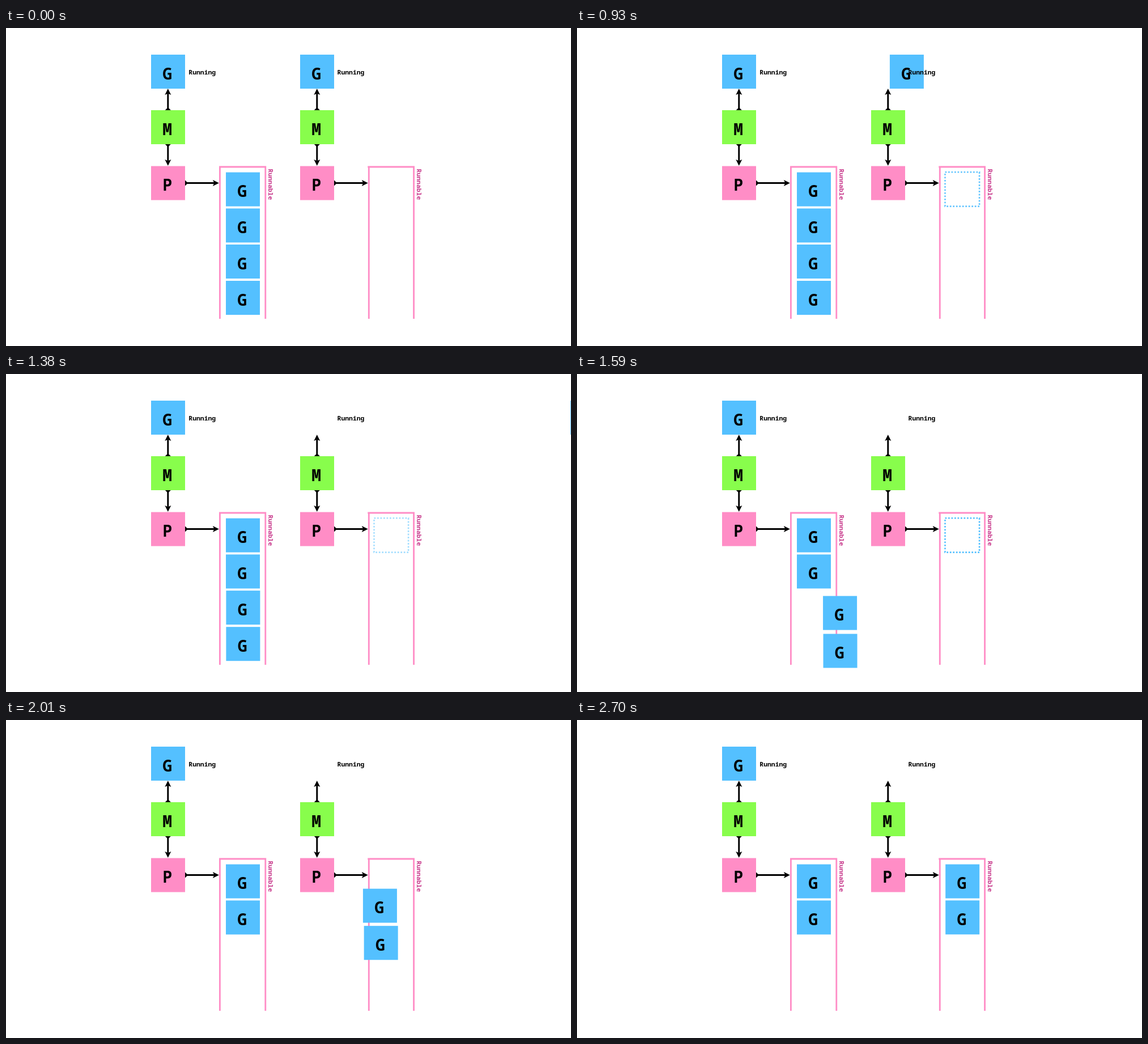
Animation, 997 px wide and 561 px high, one loop 2.73 s. Source, as an HTML page:

```html
<!DOCTYPE html>
<html lang="en">
<head>
<meta charset="utf-8">
<title>Work stealing</title>
<style>
  html, body { margin: 0; width: 100%; height: 100%; overflow: hidden; background: #fff; }
  svg { display: block; width: 100%; height: 100%; }
  text { font-family: "Noto Sans Mono", "DejaVu Sans Mono", monospace; font-weight: 600; }
  .letter { font-size: 28px; text-anchor: middle; }
  .label { font-size: 11.4px; }
</style>
</head>
<body>
<svg id="stage" viewBox="0 0 997 561"></svg>
<script>
const BLUE = '#54c0ff', GREEN = '#88fd4c', PINK = '#ff8dc6', MAGENTA = '#c83a8c';
const LOOP = 2730, STEP = 30, SIZE = 60;
const stage = document.getElementById('stage');

function add(tag, attrs, text) {
  const el = document.createElementNS('http://www.w3.org/2000/svg', tag);
  for (const key in attrs) el.setAttribute(key, attrs[key]);
  if (text) el.textContent = text;
  return el;
}

function draw(tag, attrs, text) {
  return stage.appendChild(add(tag, attrs, text));
}

function place(el, x, y) {
  el.setAttribute('transform', `translate(${x.toFixed(2)} ${y.toFixed(2)})`);
}

function box(x, y, letter, fill) {
  const g = draw('g', {});
  g.append(
    add('rect', { width: SIZE, height: SIZE, fill }),
    add('text', { x: 28.7, y: 43.7, class: 'letter' }, letter)
  );
  place(g, x, y);
  return g;
}

// Arrow of the given length, pointing along the angle, with a small wedge at its tail
function arrow(x, y, length, angle) {
  const g = draw('g', { transform: `translate(${x} ${y}) rotate(${angle})` });
  g.append(
    add('path', { d: `M0 0H${length - 7}`, stroke: '#000', 'stroke-width': 3 }),
    add('path', { d: 'M0 -5L5 0L0 5Z' }),
    add('path', { d: `M${length} 0l-11 -5.5l2.5 5.5l-2.5 5.5Z` })
  );
}

function queue(left, right, start) {
  draw('path', {
    d: `M${left} 513V245M${start} 245H${right}V513`,
    fill: 'none', stroke: PINK, 'stroke-width': 2.8
  });
  draw('text', {
    class: 'label', fill: MAGENTA,
    transform: `translate(${right + 5.5} 248.6) rotate(90)`
  }, 'Runnable');
}

function processor(x, queueLeft, queueRight, queueStart) {
  const mid = x + 29.8;
  queue(queueLeft, queueRight, queueStart);
  arrow(mid, 145, 38, -90);
  arrow(mid, 205, 38, 90);
  arrow(x + SIZE, 273.5, queueLeft - x - 61.5, 0);
  box(x, 145, 'M', GREEN);
  box(x, 243.6, 'P', PINK);
}

processor(256, 377.4, 457.8, 376);
processor(519, 640.3, 719.6, 638.3);
box(256, 47, 'G', BLUE);
box(388, 254.6, 'G', BLUE);
box(388, 318.4, 'G', BLUE);

const slot = draw('rect', {
  x: 649.5, y: 254.2, width: 60.6, height: 60.4, fill: 'none',
  stroke: BLUE, 'stroke-width': 2.6, 'stroke-dasharray': '2.8 2.7'
});
const leaver = box(519, 47, 'G', BLUE);

// Each stolen box follows a cubic curve given by offsets from its start
const stolen = [
  { x: 388, y: 382, path: [[80, 30], [222, -5], [262.2, -127.4]] },
  { x: 388, y: 446, path: [[80, 37], [228, 0], [262.2, -127.7]] }
];
for (const s of stolen) s.el = box(s.x, s.y, 'G', BLUE);

for (const x of [322.3, 584.6]) draw('text', { x, y: 82.4, class: 'label' }, 'Running');

function ease(t, start, duration) {
  const p = Math.min(1, Math.max(0, (t - start) / duration));
  return (1 - Math.cos(Math.PI * p)) / 2;
}

function along(path, u, axis) {
  const v = 1 - u;
  return 3 * u * v * v * path[0][axis] + 3 * u * u * v * path[1][axis] + u ** 3 * path[2][axis];
}

function pulse(t) {
  const start = 470, period = 745, cycles = (t - start) / period;
  if (cycles <= 0 || cycles >= 2) return 0;
  const level = (1 - Math.cos(2 * Math.PI * cycles)) / 2;
  return cycles > 0.5 && cycles < 1.5 ? 0.2 + 0.8 * level : level;
}

function render(t) {
  // Small step back, then off to the right
  place(leaver, 519 - 21 * ease(t, 450, 300) + 759 * ease(t, 750, 1048), 47);
  slot.setAttribute('opacity', pulse(t).toFixed(3));
  const u = ease(t, 1358, 851);
  for (const s of stolen) place(s.el, s.x + along(s.path, u, 0), s.y + along(s.path, u, 1));
}

const begin = performance.now();
function tick() {
  const t = (performance.now() - begin) % LOOP;
  render(Math.floor(t / STEP) * STEP);
  requestAnimationFrame(tick);
}
tick();
</script>
</body>
</html>
```
